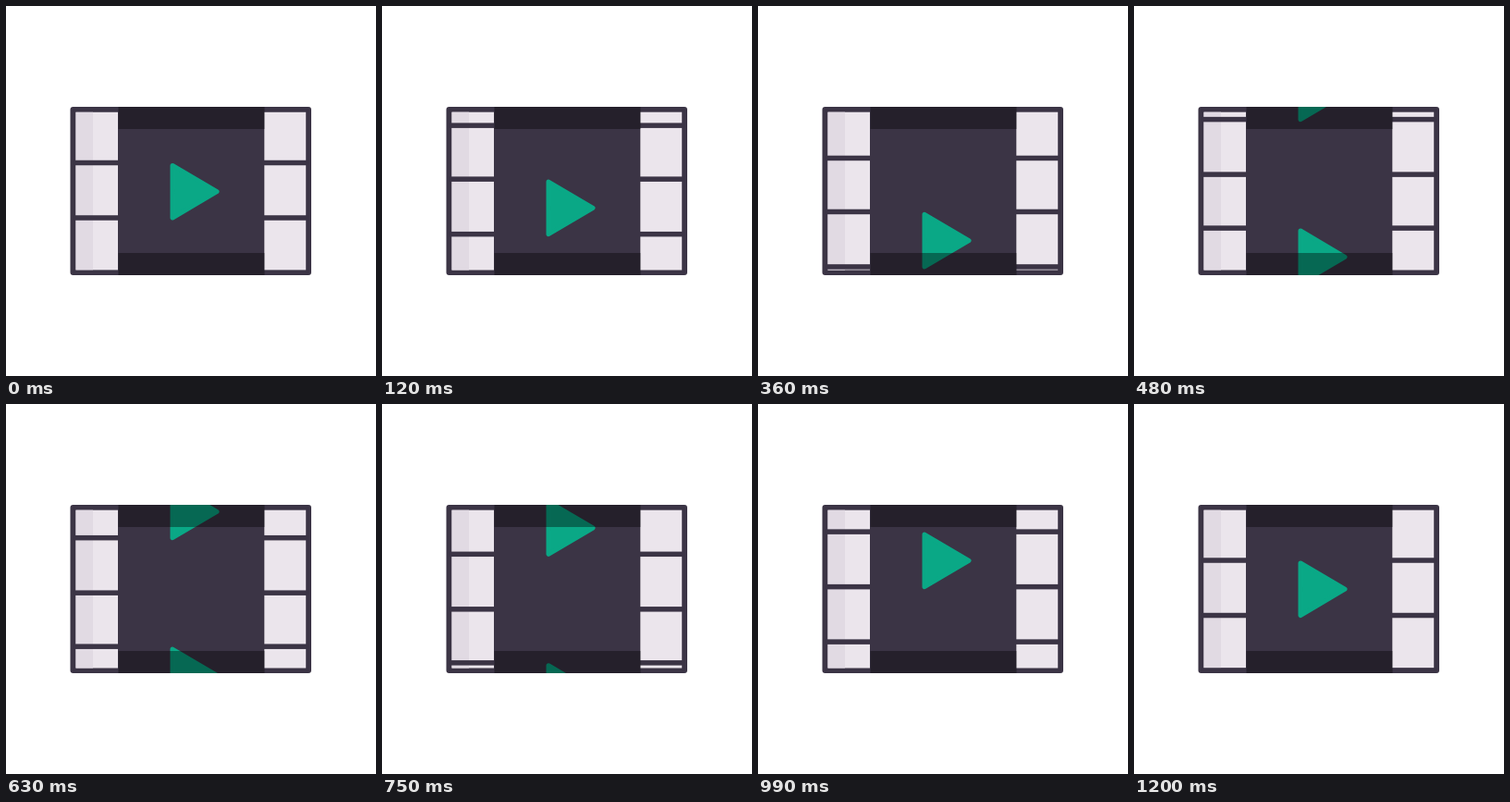
Write an HTML page with a canvas that moves like this. It is 400 by 400 pixels and loops after 1260 ms.

```html
<!DOCTYPE html>
<html lang="en">
<head>
<meta charset="utf-8">
<title>Film strip</title>
<style>
  html, body { margin: 0; width: 100%; height: 100%; overflow: hidden; background: #fff; }
  canvas { display: block; width: 400px; height: 400px; }
</style>
</head>
<body>
<canvas id="stage" width="400" height="400"></canvas>
<script>
const ctx = document.getElementById('stage').getContext('2d');

const LOOP = 1260, STEP = 30, LAST_STEP = 1200;
const PERIOD = 177;          // height of one repeat of the strip
const SPEED = 0.1471;        // px per ms
const FILM = '#3b3445', HOLE = '#ebe5ec', HOLE_SHADE = '#e1dae3', PLAY = '#0aa886';
const TOP = 109, BOTTOM = 291;

function rect(color, x, y, w, h) {
  ctx.fillStyle = color;
  ctx.fillRect(x, y, w, h);
}

function playIcon(cy) {
  ctx.beginPath();
  ctx.moveTo(180, cy - 28.3);
  ctx.lineTo(228, cy);
  ctx.lineTo(180, cy + 28.3);
  ctx.closePath();
  ctx.fillStyle = ctx.strokeStyle = PLAY;
  ctx.lineWidth = 5;
  ctx.lineJoin = 'round';
  ctx.fill();
  ctx.stroke();
}

function holeBars(y) {
  for (const x of [75, 278]) rect(FILM, x, y - 2.75, 47, 5.5);
}

function draw(ms) {
  const time = Math.min(Math.floor((ms % LOOP) / STEP) * STEP, LAST_STEP);
  const shift = time * SPEED;

  rect('#fff', 0, 0, 400, 400);
  ctx.save();
  ctx.beginPath();
  ctx.roundRect(69.5, TOP, 260.5, BOTTOM - TOP, 3);
  ctx.clip();

  rect(FILM, 69, TOP, 262, BOTTOM - TOP);
  rect(HOLE, 75.5, 114.7, 45.5, 170.8);
  rect(HOLE_SHADE, 75.5, 114.7, 18.5, 170.8);
  rect(HOLE, 279.3, 114.7, 44.9, 170.8);

  for (const repeat of [-1, 0]) {
    const offset = shift + repeat * PERIOD;
    for (const y of [169.5, 229, 288.5]) holeBars(y + offset);
    playIcon(200.7 + offset);
  }

  const shade = 'rgba(0, 0, 0, 0.38)';
  rect(shade, 121.5, TOP, 158, 24);
  rect(shade, 121.5, 267, 158, 24);
  ctx.restore();
}

function tick() {
  draw(performance.now());
  requestAnimationFrame(tick);
}
tick();
</script>
</body>
</html>
```
